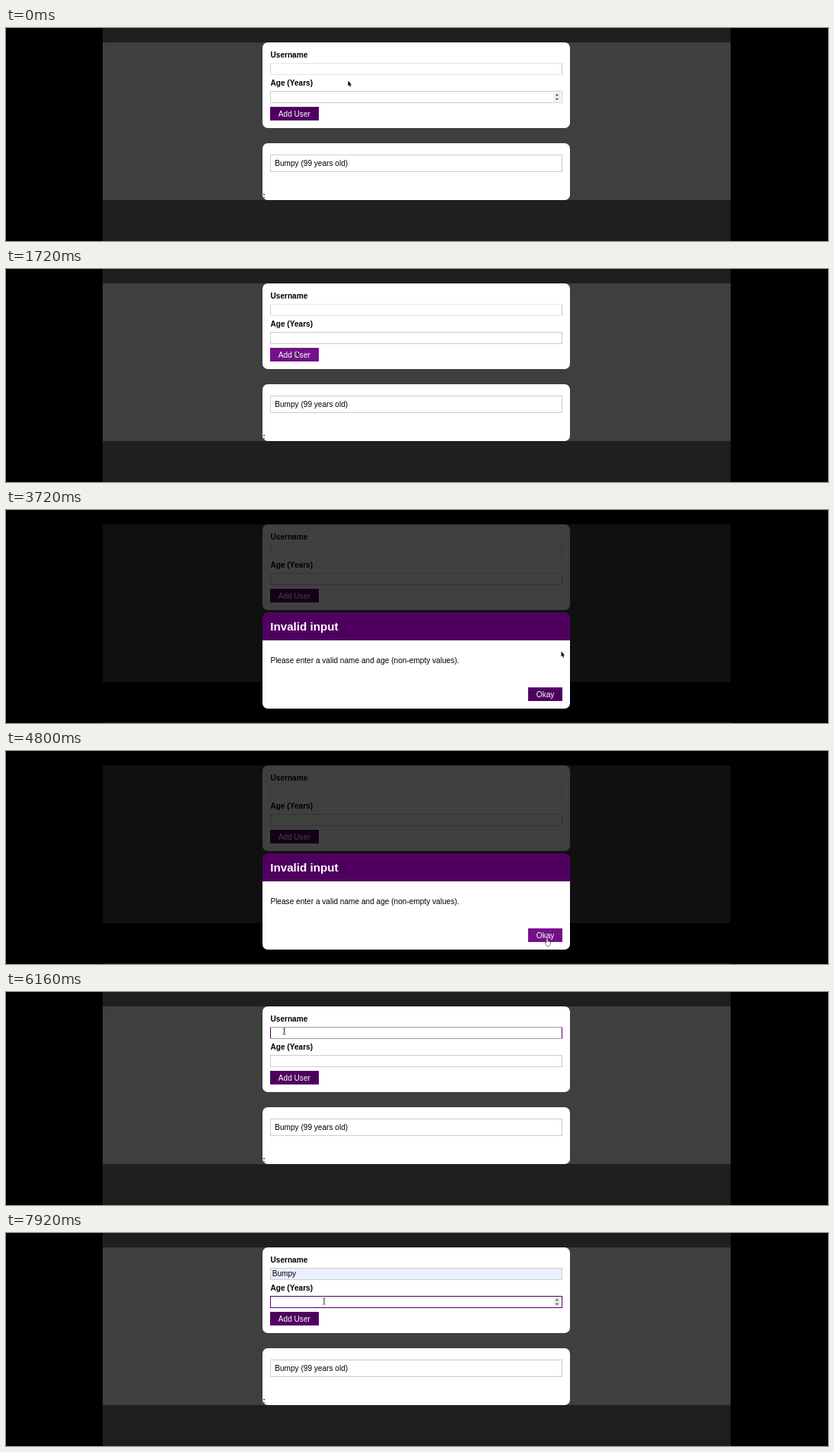
Recreate the animation shown at these times as an HTML page with a canvas. Size 1080 by 281 pixels, loop 8 s.

```html
<!DOCTYPE html>
<html lang="en">
<head>
<meta charset="utf-8">
<title>Add user form</title>
<style>
  html, body { margin: 0; width: 100%; height: 100%; overflow: hidden; background: #000; }
  canvas { display: block; width: 1080px; height: 281px; }
</style>
</head>
<body>
<canvas id="stage" width="1080" height="281"></canvas>
<script>
const ctx = document.getElementById('stage').getContext('2d');
const LOOP = 8000, STEP = 40;
const PURPLE = '#4f005f', HOVER = '#741188', GREY = '#ccc';
const USER = 'Bumpy';

// Shared column geometry
const LEFT = 337, WIDTH = 404, PAD = 10;
const INNER = LEFT + PAD, INNER_W = WIDTH - 2 * PAD;
const hit = {
  name: [INNER, 46, INNER_W, 16],
  ageLabel: [INNER, 66, INNER_W, 12],
  age: [INNER, 83, INNER_W, 16],
  add: [INNER, 104, 64, 18],
  okay: [686, 234, 45, 20]
};

// Each move eases to a point; bow pushes the middle of the way aside
const home = { x: 449, y: 69 };
const moves = [
  { from: 0, to: 200, x: 442, y: 36 },
  { from: 200, to: 840, x: 382, y: 108, bow: [0, 95] },
  { from: 840, to: 1120, x: 381, y: 108, bow: [-15, 0] },
  { from: 1760, to: 2000, x: 378, y: 109 },
  { from: 2440, to: 2880, x: 369, y: 214, bow: [336, 76] },
  { from: 3080, to: 3400, x: 729, y: 186, bow: [0, -12] },
  { from: 3720, to: 4240, x: 709, y: 252, bow: [-366, -67] },
  { from: 4520, to: 4680, x: 711, y: 247 },
  { from: 5520, to: 6160, x: 365.5, y: 52 },
  { from: 6160, to: 6360, x: 428, y: 70 },
  { from: 6680, to: 7520, x: 380, y: 168, bow: [0, 50] },
  { from: 7560, to: 7840, x: 418, y: 90 }
];

function pointerAt(t) {
  let { x, y } = home;
  for (const m of moves) {
    if (t < m.from) break;
    const u = Math.min(1, (t - m.from) / (m.to - m.from));
    const ease = u * u * (3 - 2 * u), side = Math.sin(Math.PI * u);
    const [bx, by] = m.bow || [0, 0];
    x += (m.x - x) * ease + bx * side;
    y += (m.y - y) * ease + by * side;
  }
  return { x, y };
}

const within = (p, [x, y, w, h]) => p.x >= x && p.x < x + w && p.y >= y && p.y < y + h;

function rect(x, y, w, h, color) {
  ctx.fillStyle = color;
  ctx.fillRect(x, y, w, h);
}

function rounded(x, y, w, h, color, radii = 7) {
  ctx.fillStyle = color;
  ctx.beginPath();
  ctx.roundRect(x, y, w, h, radii);
  ctx.fill();
}

function text(str, x, y, color = '#000', weight = 'normal', size = 10.1) {
  ctx.font = `${weight} ${size}px "Liberation Sans", Arial, sans-serif`;
  ctx.fillStyle = color;
  ctx.fillText(str, x, y);
}

function box([x, y, w, h], fill, sides = GREY, lines = sides) {
  rect(x, y, w, h, lines);
  rect(x, y + 1, w, h - 2, sides);
  rect(x + 1, y + 1, w - 2, h - 2, fill);
}

function button(label, [x, y, w], hovered) {
  rect(x, y, w, 18, hovered ? HOVER : PURPLE);
  text(label, x + 10.8, y + 12.5, '#fff');
}

function triangle(x, y, w, h) {
  ctx.fillStyle = '#505050';
  ctx.beginPath();
  ctx.moveTo(x - w / 2, y);
  ctx.lineTo(x + w / 2, y);
  ctx.lineTo(x, y + h);
  ctx.fill();
}

function spinner() {
  rect(719, 85, 10, 12, '#efefef');
  triangle(724, 89.3, 4.4, -2.5);
  triangle(724, 92.8, 4.4, 2.5);
}

// Path drawn as a dark or light body with a thin contrasting outline
function outlined(svgPath, fill, outline) {
  const shape = new Path2D(svgPath);
  ctx.strokeStyle = outline;
  ctx.lineWidth = 1;
  ctx.stroke(shape);
  ctx.fillStyle = fill;
  ctx.fill(shape);
}

const cursors = {
  arrow: () => outlined('M.5 .5v7l1.5-1.3 1.2 2.5 1-.5-1.1-2.4h2z', '#000', '#fff'),
  hand: () => outlined('M-.7 .5h1.4v3.5l3.3 1v3l-1 2h-3.5l-2-4h1.8z', '#fff', '#000'),
  beam() {
    rect(-.5, -3.5, 1, 7, '#222');
    for (const y of [-4.5, 3.5]) {
      rect(-1.8, y, 1.5, 1, '#444');
      rect(.3, y, 1.5, 1, '#444');
    }
  }
};

function drawPage({ focus, filled, ageHover, addHover }) {
  rect(0, 0, 1080, 281, '#000');
  rect(127, 0, 825, 281, '#1f1f1f');
  rect(127, 19, 825, 208, '#3f3f3f');

  rounded(LEFT, 19, WIDTH, 113, '#fff');
  text('Username', INNER + .5, 38.6, '#000', 'bold');
  if (focus === 'name') box(hit.name, '#fff', PURPLE, '#999');
  else box(hit.name, filled ? '#e8f0fe' : '#fff', GREY, filled ? GREY : '#e6e6e6');
  if (filled) text(USER, INNER + 2.7, 57.3);

  text('Age (Years)', INNER + .5, 76, '#000', 'bold');
  box(hit.age, '#fff', focus === 'age' ? PURPLE : GREY);
  if (focus === 'age' || ageHover) spinner();
  button('Add User', hit.add, addHover);

  rounded(LEFT, 152, WIDTH, 75, '#fff');
  box([INNER, 167, INNER_W, 23], '#fff');
  text(`${USER} (99 years old)`, INNER + 6.2, 182.1);
  rect(338, 219, 2, 1.3, '#333');
  rect(338.5, 223, 1.3, 1.5, '#333');
}

function drawModal(okayHover) {
  rect(0, 0, 1080, 280, 'rgba(0,0,0,.75)');
  rect(127, 0, 825, 19, '#000');
  rect(127, 227, 825, 53, '#000');
  rounded(LEFT, 135, WIDTH, 37, PURPLE, [7, 7, 0, 0]);
  rounded(LEFT, 172, WIDTH, 90, '#fff', [0, 0, 7, 7]);
  text('Invalid input', INNER + .3, 159, '#fff', 'bold', 15.15);
  text('Please enter a valid name and age (non-empty values).', INNER + .4, 202);
  button('Okay', hit.okay, okayHover);
}

function draw(t) {
  const p = pointerAt(t);
  const modal = t >= 1760 && t < 4840;
  const blocked = t >= 1720 && t < 4840; // pointer shape reacts just before the dialog paints
  const overAdd = within(p, hit.add);
  const overOkay = modal && within(p, hit.okay);
  const overAge = within(p, hit.age);

  drawPage({
    focus: t >= 7880 ? 'age' : t >= 6120 && t < 7840 ? 'name' : '',
    filled: t >= 7200,
    ageHover: !blocked && (overAge || within(p, hit.ageLabel)),
    addHover: !modal && overAdd
  });
  if (modal) drawModal(overOkay);

  const shape = overOkay || (!blocked && overAdd) ? 'hand'
              : !blocked && (overAge || within(p, hit.name)) ? 'beam' : 'arrow';
  ctx.save();
  ctx.translate(p.x, p.y);
  cursors[shape]();
  ctx.restore();
}

const start = performance.now();
function frame() {
  const t = (performance.now() - start) % LOOP;
  draw(Math.floor(t / STEP) * STEP);
  requestAnimationFrame(frame);
}
frame();
</script>
</body>
</html>
```
